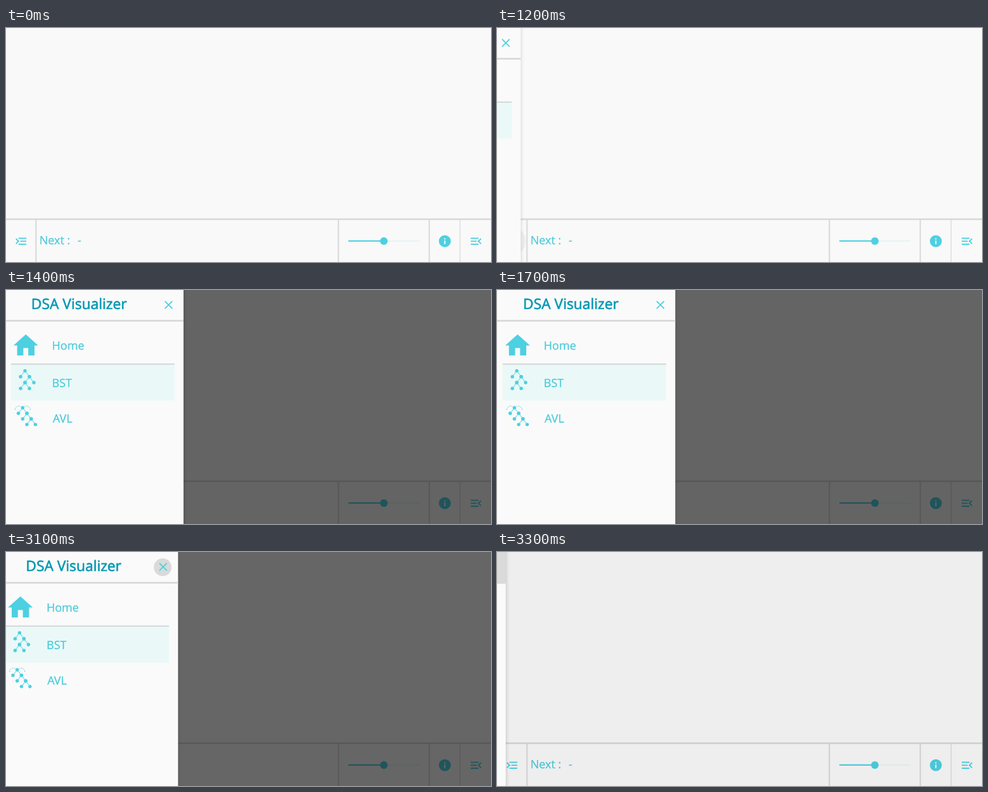
Write an HTML page with a canvas that moves like this. It is 765 by 369 pixels and loops after 3400 ms.

```html
<!DOCTYPE html>
<html lang="en">
<head>
<meta charset="utf-8">
<title>Drawer</title>
<style>
html, body { margin: 0; width: 100%; height: 100%; overflow: hidden; background: #f9f9f9; }
canvas { display: block; width: 765px; height: 369px; }
</style>
</head>
<body>
<canvas id="stage"></canvas>
<script>
const W = 765, H = 369, LOOP = 3400, STEP = 100, DRAWER = 281.25;
const CYAN = '#4dd0e1', TEXT = '#48cad9', LINE = '#d8d8d8', PAPER = '#f9f9f9';
const FONT = '"Open Sans", "Noto Sans", sans-serif';
const HOME = new Path2D('M10 20v-6h4v6h5v-8h3L12 3 2 12h3v8z');

const canvas = document.getElementById('stage');
const ctx = canvas.getContext('2d');
const dpr = window.devicePixelRatio || 1;
canvas.width = W * dpr;
canvas.height = H * dpr;

const clamp = v => Math.min(1, Math.max(0, v));

function bezier(x1, y1, x2, y2) {
  const at = (a, b, s) => 3 * a * s * (1 - s) ** 2 + 3 * b * s * s * (1 - s) + s ** 3;
  return x => {
    x = clamp(x);
    let lo = 0, hi = 1;
    for (let i = 0; i < 24; i++) {
      const mid = (lo + hi) / 2;
      if (at(x1, x2, mid) < x) lo = mid; else hi = mid;
    }
    return at(y1, y2, x === 0 ? 0 : hi);
  };
}
const easeOut = bezier(0, 0, 0.2, 1);
const easeInOut = bezier(0.4, 0, 0.2, 1);

function rect(x, y, w, h, color) {
  ctx.fillStyle = color;
  ctx.fillRect(x, y, w, h);
}

function disc(x, y, r, color) {
  ctx.fillStyle = color;
  ctx.beginPath();
  ctx.arc(x, y, r, 0, Math.PI * 2);
  ctx.fill();
}

function line(x1, y1, x2, y2, width, color = CYAN) {
  ctx.strokeStyle = color;
  ctx.lineWidth = width;
  ctx.beginPath();
  ctx.moveTo(x1, y1);
  ctx.lineTo(x2, y2);
  ctx.stroke();
}

// A thin outline gives the text its slightly heavier weight.
function label(str, x, y, size = 18, color = TEXT, weight = 0.25) {
  ctx.font = `${size}px ${FONT}`;
  ctx.textRendering = 'geometricPrecision';
  ctx.lineJoin = 'round';
  ctx.fillStyle = ctx.strokeStyle = color;
  ctx.lineWidth = weight;
  ctx.fillText(str, x, y);
  ctx.strokeText(str, x, y);
}

// Three bars and a chevron; side 1 points the chevron at the right end.
function menuIcon(cx, side) {
  ctx.save();
  ctx.translate(cx, 336.3);
  ctx.scale(0.94 * side, 0.94);
  for (const row of [-1, 0, 1]) rect(-9, row * 5 - 1, row ? 13 : 10, 2, CYAN);
  for (const dir of [-1, 1]) line(3.3, -dir * 0.7, 8.3, dir * 4.3, 2);
  ctx.restore();
}

// Each level hangs two children, then goes down on the side of the next turn.
function tree(x, y, dx, dy, turns) {
  for (const side of [-1, 1]) {
    line(x, y, x + side * dx, y + dy, 1);
    disc(x + side * dx, y + dy, 2.7, CYAN);
  }
  disc(x, y, 2.7, CYAN);
  if (turns) tree(x + (turns[0] === 'R' ? dx : -dx), y + dy, dx, dy, turns.slice(1));
}

function page(t) {
  rect(0, 0, W, H, PAPER);
  rect(0, 300.3, W, 2.5, LINE);
  for (const x of [46.3, 523.3, 666.6]) rect(x, 302, 2, 67, LINE);
  rect(715.6, 302, 1.2, 67, LINE);

  const hover = t < 2000 ? clamp(t / 400) * 0.045 : 0;
  disc(23.5, 336, 22, `rgba(0,0,0,${hover})`);
  menuIcon(23.5, -1);
  label('Next :', 52.8, 340.5);
  label('-', 113, 340.5);

  rect(596, 335, 56, 1.7, '#e1f3f5');
  rect(540, 334.8, 56, 2.1, CYAN);
  disc(596, 335.9, 6, CYAN);

  disc(692.2, 336.2, 9.4, CYAN);
  rect(691.2, 331.5, 2, 2, PAPER);
  rect(691.2, 335.2, 2, 5.7, PAPER);
  menuIcon(741.5, 1);
}

function ripple(t) {
  if (t <= 3000) return;
  ctx.save();
  ctx.beginPath();
  ctx.rect(233, 0, 49, 50);
  ctx.clip();
  disc(257, 24, (t - 3000) * 0.14, '#dadada');
  ctx.restore();
}

function drawer(edge, t) {
  ctx.save();
  ctx.translate(edge - DRAWER, 0);
  ctx.save();
  ctx.shadowColor = 'rgba(0,0,0,0.22)';
  ctx.shadowBlur = 6 * dpr;
  rect(0, -10, DRAWER, H + 20, '#fafafa');
  ctx.restore();

  label('DSA Visualizer', 41.1, 30, 22.8, '#0097b3', 0.6);
  rect(0, 47.2, DRAWER, 2.6, LINE);
  ripple(t);
  for (const dir of [-1, 1]) line(251.8, 23.5 - dir * 5.9, 263.6, 23.5 + dir * 5.9, 1.8);

  ctx.save();
  ctx.translate(9.1, 64.2);
  ctx.scale(1.95, 1.95);
  ctx.fillStyle = CYAN;
  ctx.fill(HOME);
  ctx.restore();
  label('Home', 73.8, 94.4);

  rect(9, 118, 258, 56.3, '#eaf9f8');
  rect(9, 115.8, 258, 2.1, '#d3dada');
  tree(31.2, 127.4, 7, 9.3, 'RL');
  label('BST', 73.8, 152.9);

  ctx.setLineDash([2, 1.5]);
  ctx.strokeStyle = CYAN;
  ctx.lineWidth = 1;
  for (const side of [-1, 1]) {
    ctx.beginPath();
    ctx.arc(27.5 + side * 6, 189, 6, Math.PI * (1.5 + side * 0.5), Math.PI * (1.5 - side * 0.15), side > 0);
    ctx.stroke();
  }
  ctx.setLineDash([]);
  tree(27.5, 185.7, 6.7, 8.8, 'RR');
  label('AVL', 75, 209.3);
  ctx.restore();
}

function draw(t) {
  ctx.setTransform(dpr, 0, 0, dpr, 0, 0);
  page(t);
  const opening = t - 1191.7;
  if (opening < 0) return;

  const closing = (t - 3062.8) / 325.6;
  const open = easeOut(opening / 229) * (1 - easeInOut(closing));
  const dim = 0.597 * easeInOut(opening / 221) * (1 - easeInOut(closing - 0.045));
  rect(0, 0, W, H, `rgba(0,0,0,${dim})`);
  drawer(DRAWER * open, t);
}

const start = performance.now();
function tick() {
  const t = (performance.now() - start) % LOOP;
  draw(Math.floor(t / STEP) * STEP);
  requestAnimationFrame(tick);
}
tick();
</script>
</body>
</html>
```
